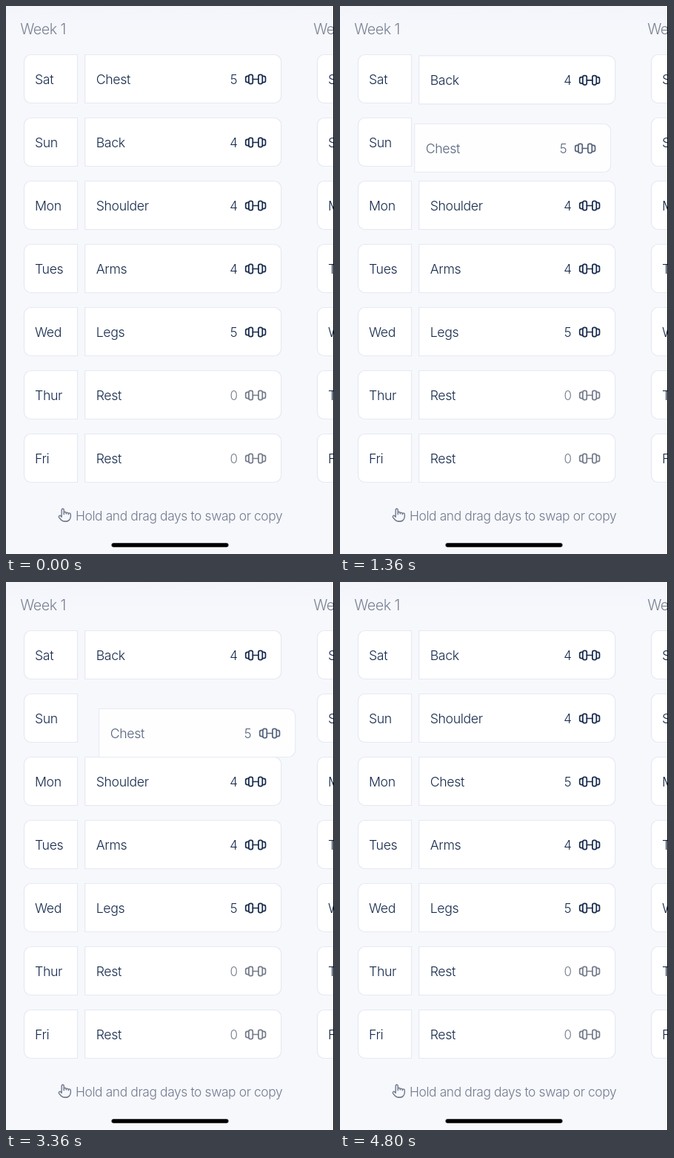
Write an HTML page that moves like this. It is 443 px wide and 737 px high and loops after 4.96 s.

```html
<!DOCTYPE html>
<html lang="en">
<head>
<meta charset="utf-8">
<title>Workout week</title>
<style>
  html, body { margin: 0; width: 100%; height: 100%; overflow: hidden; background: #f7f8fc; }
  svg { display: block; width: 443px; height: 737px; }
  text { font: 350 17.7px Inter, "Liberation Sans", sans-serif; letter-spacing: -.36px; fill: #172b4d; }
  .week { font-size: 19.8px; letter-spacing: -.55px; fill: #7b8294; }
  .hint { font-size: 17.4px; letter-spacing: -.38px; fill: #737b8f; }
  .count { font-size: 17px; text-anchor: middle; letter-spacing: 0; }
  .box { fill: #fff; stroke: #e4e9f3; stroke-width: 1.2; }
  .icon { fill: none; stroke: #172b4d; stroke-width: 1.7; stroke-linecap: round; stroke-linejoin: round; }
  .idle .icon { stroke: #747b8b; }
  .idle .count { fill: #747b8b; }
  .hand { stroke: #737b8f; stroke-width: 1.9; }
  .card { --ink: 1; }
  .card text, .card .icon { opacity: var(--ink); }
  .card .box { opacity: calc(.6 + .4 * var(--ink)); }
</style>
</head>
<body>
<svg id="stage" viewBox="0 0 443 737"></svg>
<script>
const LOOP = 4960, STEP = 80, TOP = 65.5, PITCH = 85, WEEK = 396;
const days = ['Sat', 'Sun', 'Mon', 'Tues', 'Wed', 'Thur', 'Fri'];
const workouts = [['Back', 4], ['Shoulder', 4], ['Arms', 4], ['Legs', 5], ['Rest', 0], ['Rest', 0], ['Chest', 5]];
const slotY = slot => TOP + slot * PITCH;

const dayBox = (name, i) => `<g transform="translate(24 ${slotY(i)})">
  <path class="box" d="M72.5 0V65H9.5a9 9 0 0 1-9-9V9a9 9 0 0 1 9-9Z"/>
  <text x="15" y="39.3">${name}</text></g>`;

const week = (title, x) => `<g transform="translate(${x})">
  <text class="week" x="19.3" y="37.5">${title}</text>${days.map(dayBox).join('')}</g>`;

const weight = `<rect x="3.8" y="-6.2" width="5.4" height="12.4" rx="2.2"/>
  <path d="M9.6-4.2h1.4q2.4 0 2.4 2.4v3.6q0 2.4-2.4 2.4h-1.4"/>`;
const dumbbell = `<g class="icon" transform="translate(230.4 33)">
  <path d="M-3.8 0h7.6"/>${weight}<g transform="scale(-1 1)">${weight}</g></g>`;

const card = ([name, count]) => `<g class="card${count ? '' : ' idle'}">
  <path class="box" d="M0 0H255.5a9.5 9.5 0 0 1 9.5 9.5v46a9.5 9.5 0 0 1-9.5 9.5H0Z"/>
  <text x="15" y="39.3">${name}</text>
  <text class="count" x="201" y="39">${count}</text>${dumbbell}</g>`;

const stage = document.getElementById('stage');
stage.innerHTML = `
  <linearGradient id="sky" x2="0" y2="1"><stop stop-color="#f3f5fb"/><stop offset="1" stop-color="#f7f8fc"/></linearGradient>
  <rect width="443" height="737" fill="#f7f8fc"/>
  <rect width="443" height="40" fill="url(#sky)"/>
  ${week('Week 1', 0)}${week('Week 2', WEEK)}
  ${workouts.map(card).join('')}
  <g transform="translate(70.6 674.4) scale(.76 .85)"><path class="icon hand" d="M10 11V4a2 2 0 0 0-4 0v11l-1.8-1.8a2 2 0 0 0-2.8 2.8l4 4Q8 22 12 22h2a8 8 0 0 0 8-8v-3a2 2 0 0 0-4 0v-1a2 2 0 0 0-4 0V9a2 2 0 0 0-4 0"/></g>
  <text class="hint" x="94" y="691.5">Hold and drag days to swap or copy</text>
  <rect x="142.5" y="722.2" width="158" height="5.6" rx="2.8"/>
  <rect x="442" width="1" height="737"/>`;

const cards = [...stage.querySelectorAll('.card')];
const chest = cards.at(-1);

const ramp = (t, from, to) => Math.min(1, Math.max(0, (t - from) / (to - from)));
const smooth = p => p * p * (3 - 2 * p);
const settle = (t, start) => 1 - (1 - ramp(t, start, start + 320)) ** 3;

function place(el, x, y) {
  el.setAttribute('transform', `translate(${106.7 + x} ${y})`);
}

// Pull down in a curve past the second slot, then spring back into it.
function firstDrag(t) {
  const p = ramp(t, 240, 1360), held = 1 - ramp(t, 1440, 1680);
  return [p * (43 - 49 * p) * held, PITCH * p ** 1.7 + 8 * p ** 4 * held];
}

// Lift aside, pause, pull past the third slot, then snap home.
function secondDrag(t) {
  if (t >= 4560) return [0, 2 * PITCH];
  const lift = ramp(t, 2640, 3200);
  const sway = Math.sin(Math.PI * ramp(t, 3360, 4400));
  return [19 * lift - 7.3 * sway, PITCH + 20 * lift + 83.5 * smooth(ramp(t, 3360, 4080))];
}

function draw(now) {
  const t = Math.floor(now % LOOP / STEP) * STEP;
  const [x, y] = t < 2480 ? firstDrag(t) : secondDrag(t);
  const held = ramp(t, 80, 400) - ramp(t, 1440, 1760) + ramp(t, 2480, 2800) - (t >= 4560);
  place(chest, x, TOP + y);
  chest.style.setProperty('--ink', 1 - .27 * held);
  place(cards[0], 0, slotY(1 - settle(t, 1120)));
  place(cards[1], 0, slotY(2 - settle(t, 3680)));
  requestAnimationFrame(draw);
}

cards.slice(2, -1).forEach((el, i) => place(el, 0, slotY(i + 3)));
draw(0);
</script>
</body>
</html>
```
